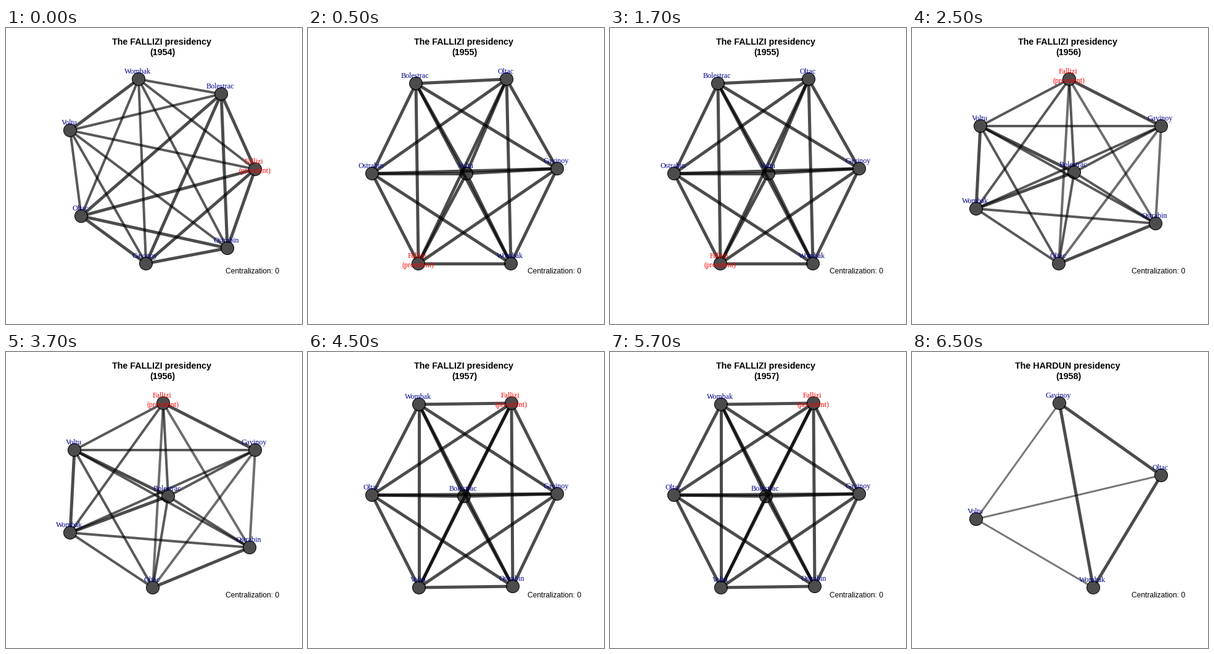
Write a matplotlib script that moves like this. It is 480 px wide and 480 px high and loops after 8 s.

```python
import math
from itertools import combinations

import matplotlib.pyplot as plt
from matplotlib.animation import FuncAnimation
from matplotlib.patches import Circle

SIZE, DPI = 480, 72
STEP_MS, LOOP_MS = 500, 8000
RADIUS = 10.5
CLIP = 11.2
HEAD = "Fallizi"

# Edge styles: (line width, opacity)
STRONG, MEDIUM, WEAK, FAINT = (5, .70), (4, .65), (4, .57), (3, .53)


def style_1954(a, b):
    outer = {"Wombak", "Voltu"}
    return STRONG if (a in outer) == (b in outer) else MEDIUM


def style_1956(a, b):
    blocs = dict(Fallizi=0, Gavinoy=0, Ostrabin=1, Oltac=1)
    pair = {blocs.get(a, 2), blocs.get(b, 2)}
    if len(pair) == 1:
        return STRONG
    return WEAK if pair == {0, 1} else MEDIUM


def style_1958(a, b):
    return FAINT if "Voltu" in (a, b) else STRONG


def style_equal(a, b):
    return STRONG


# (start ms, year, president, edge style, node positions)
SCENES = [
    (0, 1954, "FALLIZI", style_1954, dict(
        Wombak=(215, 83), Bolestrac=(349, 107), Fallizi=(404, 229),
        Ostrabin=(359, 357), Gavinoy=(227, 382), Oltac=(122, 305),
        Voltu=(104, 166))),
    (500, 1955, "FALLIZI", style_equal, dict(
        Bolestrac=(175, 90), Oltac=(322, 83), Gavinoy=(404, 228),
        Wombak=(329, 382), Fallizi=(179, 382), Ostrabin=(104, 236),
        Voltu=(257, 236))),
    (2500, 1956, "FALLIZI", style_1956, dict(
        Fallizi=(255, 83), Gavinoy=(404, 159), Ostrabin=(395, 317),
        Oltac=(238, 382), Wombak=(104, 293), Voltu=(111, 159),
        Bolestrac=(263, 234))),
    (4500, 1957, "FALLIZI", style_equal, dict(
        Fallizi=(330, 83), Gavinoy=(404, 230), Ostrabin=(332, 380),
        Voltu=(180, 382), Oltac=(104, 232), Wombak=(180, 85),
        Bolestrac=(253, 234))),
    (6500, 1958, "HARDUN", style_1958, dict(
        Gavinoy=(239, 83), Oltac=(404, 200), Wombak=(294, 382),
        Voltu=(104, 271))),
]

fig = plt.figure(figsize=(SIZE / DPI, SIZE / DPI), dpi=DPI, facecolor="white")
ax = fig.add_axes([0, 0, 1, 1])


def write(x, y, text, size=12, font="Liberation Sans", ha="center", **style):
    ax.text(x, y, text, fontsize=size, family=font, ha=ha, va="baseline", **style)


def draw_edge(p, q, width, alpha):
    (x0, y0), (x1, y1) = p, q
    length = math.hypot(x1 - x0, y1 - y0)
    dx, dy = CLIP * (x1 - x0) / length, CLIP * (y1 - y0) / length
    ax.plot([x0 + dx, x1 - dx], [y0 + dy, y1 - dy], color="black",
            lw=width, alpha=alpha, solid_capstyle="round")


def draw_label(name, x, y):
    color = "red" if name == HEAD else "darkblue"
    write(x - 1.7, y - 9, name, font="Liberation Serif", color=color)
    if name == HEAD:
        write(x - .5, y + 6, "(president)", font="Liberation Serif", color=color)


def draw(frame):
    now = frame * STEP_MS
    _, year, president, style, nodes = [s for s in SCENES if s[0] <= now][-1]
    ax.clear()
    ax.set(xlim=(0, SIZE), ylim=(SIZE, 0))
    ax.axis("off")

    for a, b in combinations(nodes, 2):
        draw_edge(nodes[a], nodes[b], *style(a, b))
    for center in nodes.values():
        ax.add_patch(Circle(center, RADIUS, fc=(0, 0, 0, .7), ec="black",
                            lw=1, zorder=3))
    for name, (x, y) in nodes.items():
        draw_label(name, x, y)

    write(252.5, 27, f"The {president} presidency", 14.3, weight="bold")
    write(254, 44, f"({year})", 14.3, weight="bold")
    write(356, 398, "Centralization: 0", ha="left")
    return []


anim = FuncAnimation(fig, draw, frames=LOOP_MS // STEP_MS, interval=STEP_MS,
                     init_func=lambda: [], repeat=True, repeat_delay=0)
plt.show()
```
